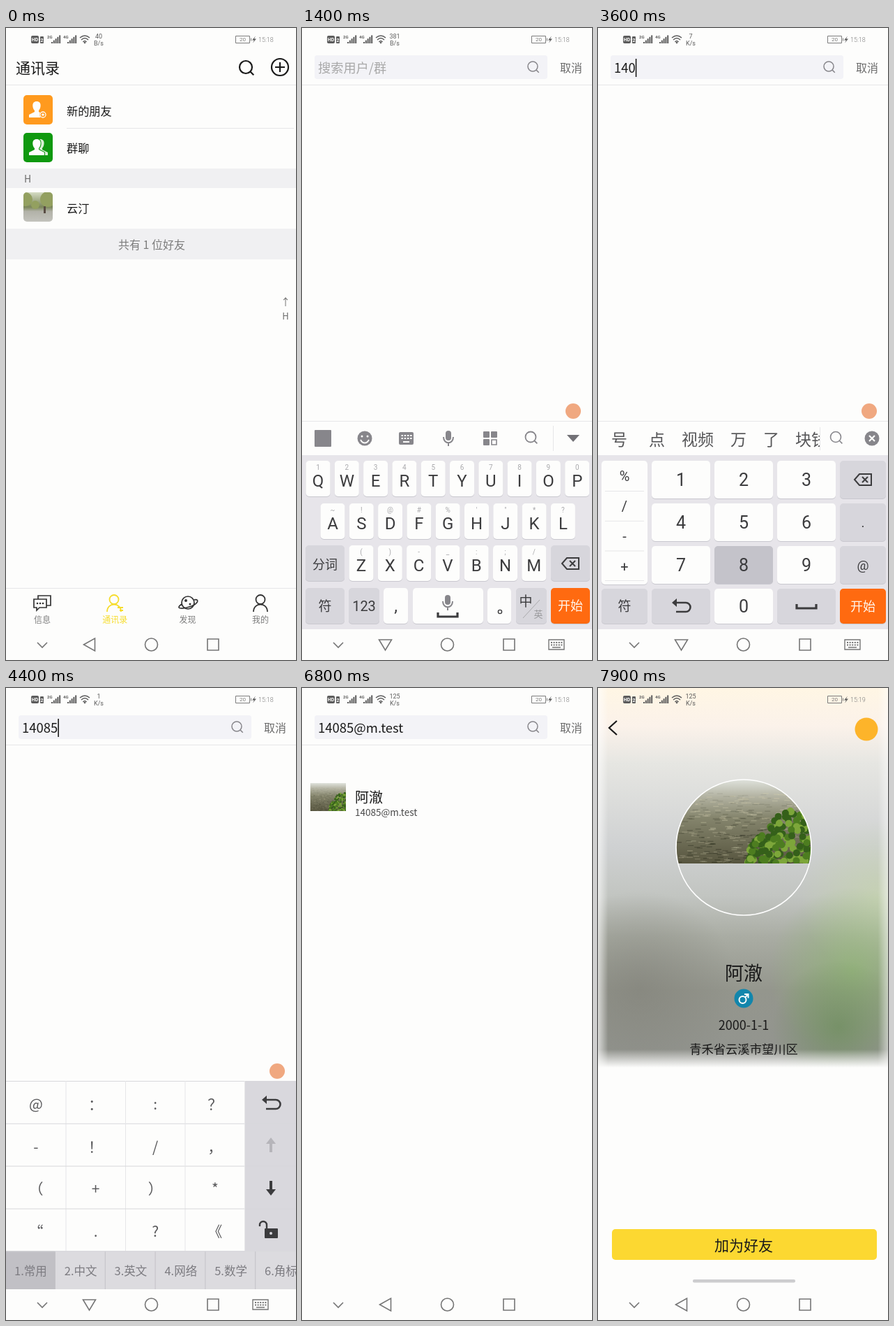
An HTML page with a canvas that plays this animation: 416 px wide and 904 px high, repeating every 8 s.

```html
<!DOCTYPE html>
<html lang="zh-CN">
<head>
<meta charset="utf-8">
<title>联系人搜索</title>
<style>
html, body { margin: 0; width: 100%; height: 100%; overflow: hidden; background: #fdfdfd; }
canvas { display: block; width: 416px; height: 904px; }
</style>
</head>
<body>
<canvas id="stage" width="416" height="904"></canvas>
<script>
const ctx = document.getElementById('stage').getContext('2d');
const LOOP = 8000, W = 416, PAGE_H = 860;
const PAPER = '#fdfdfc', BAND = '#f0f0f2', FIELD = '#f3f3f7', RULE = '#e6e6e8', INK = '#1a1a1a',
      SOFT = '#7c7c7c', KEYBED = '#e7e5ea', DARK_KEY = '#d7d6dc', KEY_INK = '#3c3c3e', TOOL = '#87868b', ORANGE = '#ff6a10';
const CJK = '"Noto Sans CJK SC", "Noto Sans CJK", sans-serif', LATIN = 'Roboto, "Noto Sans CJK SC", "Noto Sans CJK", sans-serif';

const clamp = v => Math.max(0, Math.min(1, v));
const progress = (t, start, length) => clamp((t - start) / length);
const easeOut = u => 1 - (1 - u) ** 4;
const latest = (list, t) => list.filter(e => e[0] <= t).pop();
const noise = n => { const v = Math.sin(n * 12.9898) * 43758.5453; return v - Math.floor(v); };

// Timeline
const SPEED = [[0, '40', 'B/s'], [500, '381', 'B/s'], [2300, '7', 'K/s'], [3700, '1', 'K/s'], [5000, '126', 'B/s'], [5900, '125', 'K/s']];
const TYPED = [[800, ''], [2400, '1'], [3000, '14'], [3300, '140'], [3700, '1408'], [4000, '14085'], [4700, '14085@'], [5100, '14085@m.test']];
const PRESSES = [['123', 1650], ['1', 2350], ['4', 2950], ['0', 3250], ['8', 3650], ['5', 3950], ['符', 4250], ['@', 4600]];
const PANELS = [[0, letterPad], [1750, numberPad], [4400, symbolPad], [4800, numberPad]];
let now = 0;
const pressed = label => PRESSES.some(([l, at]) => l === label && Math.abs(now - at) < 90);

// Drawing helpers: y of text is its visual centre
function text(s, x, y, size, color = INK, align = 'left', font = CJK, weight = 400) {
  ctx.font = `${weight} ${size}px ${font}`;
  ctx.textAlign = align;
  ctx.fillStyle = color;
  ctx.fillText(s, x, y + size * .37);
}
const centre = (s, x, y, size, color, font, weight) => text(s, x, y, size, color, 'center', font, weight);
function rect(x0, y0, x1, y1, fill, r = 0) {
  ctx.beginPath();
  ctx.roundRect(x0, y0, x1 - x0, y1 - y0, r);
  ctx.fillStyle = fill;
  ctx.fill();
}
function disc(x, y, r, fill) {
  ctx.beginPath();
  ctx.arc(x, y, r, 0, 7);
  ctx.fillStyle = fill;
  ctx.fill();
}
function stroke(d, x, y, color, width = 1.6) {
  ctx.save();
  ctx.translate(x, y);
  ctx.strokeStyle = color;
  ctx.lineWidth = width;
  ctx.stroke(new Path2D(d));
  ctx.restore();
}
function shape(d, x, y, fill) {
  ctx.save();
  ctx.translate(x, y);
  ctx.fillStyle = fill;
  ctx.fill(new Path2D(d));
  ctx.restore();
}
const ring = r => `M${r} 0A${r} ${r} 0 1 1 ${-r} 0A${r} ${r} 0 1 1 ${r} 0`;
function clipped(path, draw) {
  ctx.save();
  ctx.beginPath();
  path();
  ctx.clip();
  draw();
  ctx.restore();
}
function gradient(y0, y1, ...stops) {
  const g = ctx.createLinearGradient(0, y0, 0, y1);
  stops.forEach(([at, color]) => g.addColorStop(at, color));
  return g;
}
function glow(x, y, r, rgb, alpha = .8) {
  const g = ctx.createRadialGradient(x, y, 0, x, y, r);
  g.addColorStop(0, `rgba(${rgb},${alpha})`);
  g.addColorStop(1, `rgba(${rgb},0)`);
  ctx.fillStyle = g;
  ctx.fillRect(x - r, y - r, 2 * r, 2 * r);
}
const magnifier = (x, y, r, color, width) =>
  stroke(`${ring(r)}M${r * .7} ${r * .7}L${r * 1.25} ${r * 1.25}`, x, y, color, width);
function ripple(x, y, start) {
  const u = progress(now, start, 300);
  if (u > 0 && u < 1) {
    disc(x, y, 8 + 12 * u, `rgba(140,140,145,${.2 * (1 - u * .6)})`);
    stroke(ring(8 + 12 * u), x, y, 'rgba(140,140,145,.35)', 1);
  }
}

// System bars
function statusBar() {
  const ink = '#5c5c5c', [, amount, unit] = latest(SPEED, now);
  rect(36, 11, 47, 22, ink, 2);
  centre('HD', 41.5, 16.5, 7, PAPER, LATIN, 700);
  rect(49, 12, 54, 22, ink, 1);
  centre('2', 51.5, 17, 7, PAPER, LATIN, 700);
  [['2G', 59], ['4G', 82]].forEach(([label, x]) => {
    text(label, x, 13, 6, ink, 'left', LATIN, 700);
    for (let i = 0; i < 5; i++) rect(x + 6 + i * 2.8, 20 - i * 2.4, x + 8 + i * 2.8, 22, ink);
  });
  stroke('M-7 -4Q0 -10 7 -4M-5 -1Q0 -6 5 -1M-2.5 2Q0 -1 2.5 2', 113, 18, ink, 1.5);
  disc(113, 21, 1.3, ink);
  centre(amount, 133, 12, 9, ink, LATIN);
  centre(unit, 133, 22, 9, ink, LATIN);
  stroke('M0 0H20V10H0ZM22 3V7', 329.5, 11.5, SOFT, 1);
  centre('20', 339.5, 16.5, 8, SOFT, LATIN);
  shape('M2 -5L-3 1H0L-2 5L3 -1H0Z', 356, 16.5, ink);
  text(now < 7800 ? '15:18' : '15:19', 362, 16.5, 9, SOFT, 'left', LATIN, 300);
}
function navBar() {
  const typing = now >= 850 && now < 5900, c = '#757575';
  rect(0, PAGE_H, W, 904, PAPER);
  stroke('M-7 -3L0 4L7 -3', 52, 882, c);
  stroke(typing ? 'M-9 -7H9L0 8Z' : 'M-8 0L8 -9V9Z', 119.5, 882, c);
  stroke(ring(9), 208.5, 882, c);
  stroke('M-8 -8H8V8H-8Z', 297, 882, c);
  if (typing) keyboardIcon(365, 882, c);
}
function keyboardIcon(x, y, c) {
  stroke('M-11 -7H11V7H-11ZM-6 4H6', x, y, c, 1.4);
  for (let i = 0; i < 10; i++) rect(x - 8 + i % 5 * 3.6, y - 4 + (i > 4) * 3.5, x - 6 + i % 5 * 3.6, y - 2 + (i > 4) * 3.5, c);
}

// Contacts
const PERSON = 'M0 -12C8 -12 6 -2 3 1V3L11 7V11H-11V7L-3 3V1C-6 -2 -8 -12 0 -12Z';
const HEAD = 'M0 -11A6.5 6.5 0 1 1 0 2A6.5 6.5 0 1 1 0 -11M-10 13C-10 -1 10 -1 10 13';
function contactsPage() {
  rect(0, 0, W, PAGE_H, PAPER);
  text('通讯录', 14, 57.5, 21);
  magnifier(344, 56, 9, INK, 2.2);
  ripple(345, 57, 80);
  stroke(`${ring(12)}M-7 0H7M0 -7V7`, 393, 56, INK, 2.2);
  rect(0, 81, W, 82, RULE);
  rect(25, 96, 67, 138, '#ff9a1e', 5);
  shape(PERSON, 44, 117, PAPER);
  disc(53, 124, 5, '#ff9a1e');
  stroke(`${ring(4)}M-2 0H2M0 -2V2`, 53, 124, PAPER, 1.3);
  text('新的朋友', 87, 119, 16.2);
  rect(87, 143, 413, 144, RULE);
  rect(25, 150, 67, 192, '#0f990f', 5);
  shape(PERSON, 49, 171, '#d8efd4');
  stroke(PERSON, 44, 171, '#0f990f', 2);
  shape(PERSON, 44, 171, PAPER);
  text('群聊', 87, 172.5, 16.2);
  rect(0, 201, W, 229, BAND);
  text('H', 26, 216, 14, '#6c6c6c');
  clipped(() => ctx.roundRect(25, 235, 42, 42, 5), () => {
    rect(25, 235, 67, 277, gradient(235, 277, [0, '#d5dcc4'], [.5, '#7a8658'], [.65, '#b2b2a8'], [1, '#c3c3bd']));
    [[28, 245, 10], [42, 253, 6], [60, 245, 11]].forEach(([x, y, r]) => disc(x, y, r, '#93a060'));
    rect(54, 255, 57, 265, '#594d44');
  });
  text('云汀', 87, 258, 16.2);
  rect(0, 287, W, 331, BAND);
  centre('共有 1 位好友', 209, 310, 16, SOFT);
  centre('↑', 401, 392, 14, '#6c6c6c');
  centre('H', 401, 412, 13, '#6c6c6c');
  rect(0, 801, W, 802, RULE);
  const yellow = '#f6dc2c', c = '#333333';
  stroke('M-12 -5H6V7H-4L-8 11V7H-12ZM-6 -5V-10H12V4H6', 52, 822, c, 1.7);
  [-7, -3, 1].forEach(dx => disc(52 + dx, 823, 1.3, c));
  stroke(HEAD, 155, 822, yellow, 1.8);
  stroke('M5 7H13M8 11H13', 155, 822, yellow, 1.8);
  stroke(`${ring(9)}M-9 2C-20 10 -6 9 5 5C17 0 15 -6 9 -4`, 261, 822, c, 1.7);
  disc(258, 819, 2, c);
  disc(264, 824, 1.5, c);
  stroke(HEAD, 365, 822, c, 1.8);
  ['信息', '通讯录', '发现', '我的'].forEach((s, i) => centre(s, 52 + i * 104.3, 847, 12, i === 1 ? yellow : SOFT));
}

// Keyboard
function key(x0, y0, x1, y1, label, { dark, size = 24, hint, fill, color = KEY_INK } = {}) {
  rect(x0, y0 + 1, x1, y1 + 1, '#c9c8cf', 5);
  rect(x0, y0, x1, y1, pressed(label) ? '#c4c3ca' : fill || (dark ? DARK_KEY : PAPER), 5);
  const x = (x0 + x1) / 2, y = (y0 + y1) / 2 + (hint ? 2.5 : 0);
  centre(label, x, y, size, color, LATIN);
  if (hint) centre(hint, x, y0 + 9, 10, '#a9a9ac', LATIN);
}
const backspace = (x, y) => stroke('M-12 0L-5 -8H12V8H-5ZM-1 -4L7 4M7 -4L-1 4', x, y, KEY_INK, 2);
const spaceMark = (x, y) => stroke('M-14 -4V2H14V-4', x, y, KEY_INK, 3.2);
const returnMark = (x, y) => {
  stroke('M-8 -5H7A6.5 6.5 0 0 1 7 8H-7', x, y, KEY_INK, 2.6);
  shape('M-13 -5L-6 -11V1Z', x, y, KEY_INK);
};
function mic(x, y, c) {
  rect(x - 4, y - 11, x + 4, y + 3, c, 4);
  stroke('M-7 -2C-7 9 7 9 7 -2M0 6V11', x, y, c, 2);
}
function toolbar() {
  rect(18, 575, 42, 599, TOOL, 1);
  disc(90, 587, 10.5, TOOL);
  disc(86, 584, 1.5, PAPER);
  disc(94, 584, 1.5, PAPER);
  stroke('M-6 2C-3 8 3 8 6 2', 90, 587, PAPER, 1.8);
  rect(139, 578, 160, 596, TOOL, 2);
  for (let i = 0; i < 8; i++) rect(142.5 + i % 4 * 4.2, 582 + (i > 3) * 4, 145 + i % 4 * 4.2, 584 + (i > 3) * 4, PAPER);
  rect(145, 591, 154, 593, PAPER);
  mic(210, 587, TOOL);
  [[260, 577], [271, 577], [260, 588]].forEach(([x, y]) => rect(x, y, x + 9, y + 9, TOOL, 1));
  stroke('M0 0H7V7H0Z', 272, 589, TOOL);
  magnifier(328, 585, 7.5, TOOL, 1.8);
  rect(360, 569, 361, 605, RULE);
  shape('M-9 -5H9L0 5Z', 389, 587, '#727176');
}
function candidates(words) {
  clipped(() => ctx.rect(0, 563, 318, 48), () => words.forEach(([s, x]) => text(s, x, 588, 23, '#555557', 'left', CJK, 200)));
  rect(318, 571, 319, 604, RULE);
  magnifier(341, 585, 7.5, TOOL, 1.6);
  disc(393, 587, 10.5, TOOL);
  stroke('M-4 -4L4 4M4 -4L-4 4', 393, 587, PAPER, 2.2);
}
function bed() {
  rect(0, 562, W, 612, PAPER);
  rect(0, 562, W, 563, RULE);
  rect(0, 611, W, PAGE_H, KEYBED);
}
const startKey = (x, y) => key(x, y, 413, 852, '开始', { fill: ORANGE, color: '#fff6ee', size: 18 });
function letterPad() {
  bed();
  toolbar();
  [['QWERTYUIOP', '1234567890', 23, 619], ['ASDFGHJKL', '~!@#%\'"*?', 44, 680], ['ZXCVBNM', '()-_:;/', 85, 740]].forEach(([row, hints, x, y]) =>
    [...row].forEach((s, i) => key(x - 17.5 + i * 41.3, y, x + 17.5 + i * 41.3, y + 51, s, { hint: hints[i] })));
  key(5, 740, 61, 791, '', { dark: true });
  centre('分词', 33, 767, 18, KEY_INK);
  key(357, 740, 413, 791, '', { dark: true });
  backspace(385, 766);
  key(5, 801, 61, 852, '符', { dark: true, size: 19 });
  key(67, 801, 111, 852, '123', { dark: true, size: 20 });
  key(117, 801, 152, 852, ',');
  key(159, 801, 260, 852, '');
  mic(209, 822, TOOL);
  spaceMark(209, 840);
  key(266, 801, 300, 852, '');
  stroke(ring(2.6), 284, 835, KEY_INK, 1.4);
  key(307, 801, 351, 852, '', { dark: true });
  centre('中', 321, 820, 19, KEY_INK);
  centre('英', 339, 838, 13, '#99999c');
  stroke('M-10 14L14 -12', 327, 830, '#a9a9ac', 1);
  startKey(357, 801);
}
function numberPad() {
  bed();
  if (now >= 2400 && now < 4400) candidates([['号', 19], ['点', 73], ['视频', 120], ['万', 190], ['了', 237], ['块钱', 283]]);
  else if (now >= 4800 && now < 5100) candidates([['m.test', 20], ['k.test', 122], ['d.test', 222]]);
  else toolbar();
  key(5, 619, 71, 796, '');
  ['%', '/', '-', '+'].forEach((s, i) => {
    centre(s, 38, 641 + i * 42.7, 20, KEY_INK, LATIN);
    rect(10, 662 + i * 42.7, 66, 663 + i * 42.7, RULE);
  });
  for (let i = 0; i < 9; i++) {
    const x = 77 + i % 3 * 90, y = 619 + Math.floor(i / 3) * 61;
    key(x, y, x + 84, y + 54, String(i + 1), { size: 25 });
  }
  ['', '.', '@'].forEach((s, i) => key(347, 619 + i * 61, 413, 673 + i * 61, s, { dark: true, size: 19 }));
  backspace(380, 646);
  key(5, 802, 71, 852, '符', { dark: true, size: 19 });
  key(77, 802, 161, 852, '', { dark: true });
  returnMark(119, 827);
  key(167, 802, 251, 852, '0', { size: 25 });
  key(257, 802, 341, 852, '', { dark: true });
  spaceMark(299, 828);
  startKey(347, 802);
}
function symbolPad() {
  rect(0, 562, W, PAGE_H, PAPER);
  rect(342, 562, W, PAGE_H, '#d9d8dd');
  rect(0, 805, W, PAGE_H, '#dcdbdf');
  rect(0, 805, 70, PAGE_H, '#c1c0c5');
  if (pressed('@')) rect(0, 562, 85, 623, '#d9d8dd');
  [...'@：:？-！/，（+）*“.?《'].forEach((s, i) =>
    centre(s, 43 + i % 4 * 85.6, 595 + Math.floor(i / 4) * 60.8, 21, '#59595b', CJK, 200));
  for (let i = 0; i < 5; i++) {
    rect(0, 562 + i * 60.8, W, 563 + i * 60.8, '#d8d8dc');
    if (i < 4) rect(85.5 * (i + 1), 562, 85.5 * (i + 1) + 1, 805, RULE);
    rect(70 + i * 71.8, 806, 71 + i * 71.8, PAGE_H, '#c3c2c7');
  }
  returnMark(380, 594);
  [[654, '#b6b5ba', -1], [715, KEY_INK, 1]].forEach(([y, c, dir]) => {
    stroke(`M0 ${-10 * dir}V${6 * dir}`, 380, y, c, 4);
    shape(`M-7 ${2 * dir}H7L0 ${11 * dir}Z`, 380, y, c);
  });
  rect(371, 773, 390, 787, KEY_INK, 1);
  disc(380, 780, 2, DARK_KEY);
  stroke('M-11 0V-2A5 5 0 0 1 -1 -2V3', 375, 770, KEY_INK, 2.4);
  ['常用', '中文', '英文', '网络', '数学', '角标'].forEach((s, i) => text(`${i + 1}.${s}`, 12 + i * 71.8, 834, 16.5, '#7c7b80', 'left', CJK, 200));
}
function keyboard() {
  const hidden = 1 - easeOut(progress(now, 1050, 250)) + progress(now, 5680, 220) ** 2;
  if (hidden >= 1) return;
  clipped(() => ctx.rect(0, 0, W, PAGE_H), () => {
    ctx.translate(0, hidden * 330);
    disc(389, 548, 11, '#f0a880');
    latest(PANELS, now)[1]();
  });
}

// Search
function landscape(x, y, w, h) {
  clipped(() => ctx.rect(x, y, w, h), () => {
    rect(x, y, x + w, y + h, gradient(y, y + h, [0, '#dfe2dc'], [.2, '#b3b3a2'], [.45, '#85856d'], [1, '#57553f']));
    const u = w / 194;
    for (let i = 0; i < 420; i++) {
      const depth = .15 + .85 * noise(i + .3), px = x + w * noise(i), py = y + h * depth;
      rect(px, py, px + 8 * u, py + 1.3 * u, i % 2 ? `rgba(205,200,170,${.5 - depth * .25})` : `rgba(40,42,28,${depth * .5})`);
    }
    for (let i = 0; i < 160; i++) {
      const fx = noise(i + 500), fy = noise(i + 700);
      const top = .85 - .5 * Math.sin(Math.min(1, fx * 1.3) * 1.57);
      disc(x + w * (.53 + .47 * fx), y + h * (top + (1 - top) * fy), 5 * u, ['#4d7d20', '#7da63a', '#35601a'][i % 3]);
    }
  });
}
function searchPage() {
  rect(0, 0, W, PAGE_H, PAPER);
  rect(18, 39, 352, 73, FIELD, 4);
  const [since, value] = latest(TYPED, now) || [0, ''];
  if (value) text(value, 23, 57, 18.5);
  else text('搜索用户/群', 23, 57, 18.2, '#a8a8a8');
  const lastEdge = Math.floor((now - since) / 500);
  if (since && now < 5700 && lastEdge % 2 === 0) {
    ctx.font = `18.5px ${CJK}`;
    const x = 23 + ctx.measureText(value).width;
    rect(x, 44, x + 1.6, 70, INK);
  }
  magnifier(331, 55, 7, TOOL, 1.5);
  ripple(336, 53, 5450);
  text('取消', 370, 57, 16, '#6c6c6c');
  rect(0, 81, W, 82, RULE);
  if (now >= 5950) {
    if (now >= 6300) {
      ctx.globalAlpha = now < 6400 ? .6 : 1;
      landscape(12, 136, 51, 40);
      ctx.globalAlpha = 1;
    }
    text('阿澈', 76, 157, 20);
    text('14085@m.test', 76, 178, 13.5, '#484848');
  }
  keyboard();
}

// Profile
function backdrop(reveal) {
  const bottom = 8 + 535 * reveal;
  clipped(() => ctx.rect(0, 0, W, bottom), () => {
    ctx.fillStyle = gradient(0, 540, [0, '#fff6e4'], [.1, '#fbf2ea'], [.2, '#e6e6e2'], [.42, '#cfd1d2'], [.55, '#c2c5c1'], [.66, '#a9aca3'], [.8, '#94968d'], [1, '#92948f']);
    ctx.fillRect(0, 0, W, 543);
    glow(400, 300, 110, '198,212,176');
    glow(365, 405, 120, '145,182,118');
    glow(345, 485, 95, '112,142,96');
    glow(60, 430, 140, '128,128,120', .6);
    const side = ctx.createLinearGradient(0, 0, W, 0);
    [[0, .65], [.035, 0], [.965, 0], [1, .5]].forEach(([at, a]) => side.addColorStop(at, `rgba(255,255,255,${a})`));
    ctx.fillStyle = side;
    ctx.fillRect(0, 0, W, 545);
    ctx.fillStyle = gradient(bottom - 26, bottom, [0, 'rgba(253,253,252,0)'], [1, PAPER]);
    ctx.fillRect(0, bottom - 26, W, 27);
    clipped(() => ctx.arc(209, 228, 97, 0, 7), () =>
      clipped(() => ctx.rect(100, 131, 220, 120 * reveal), () => landscape(112, 131, 194, 120)));
    stroke(ring(97), 209, 228, '#ffffff', 1.6);
    ctx.fillStyle = `rgba(255,255,255,${.3 * (1 - reveal)})`;
    ctx.fillRect(0, 82, W, 460);
  });
}
function profilePage() {
  rect(0, 0, W, PAGE_H, PAPER);
  backdrop(progress(now, 6700, 1000));
  stroke('M11 -10L0 0L11 10', 16, 57, INK, 2.2);
  disc(385, 59, 16.5, '#fdb42a');
  centre('阿澈', 209, 408, 27);
  disc(209, 444, 13.5, '#1286ac');
  stroke(`${ring(5)}M4 -4L8 -8M2.5 -8H8V-2.5`, 207.5, 446, PAPER, 2);
  centre('2000-1-1', 209, 482, 18);
  centre('青禾省云溪市望川区', 209, 517, 17.3);
  rect(20, 774, 400, 818, '#fcd831', 5);
  centre('加为好友', 209, 797, 21);
  rect(136, 846, 283, 850.5, '#cdcdcf', 2);
}

// The old page drifts left under a shade while the new one covers it
function push(oldPage, newPage, start) {
  const u = easeOut(progress(now, start, 530));
  if (u < 1) {
    ctx.save();
    ctx.translate(-W * .25 * u, 0);
    oldPage();
    ctx.restore();
    rect(0, 0, W, PAGE_H, `rgba(0,0,0,${.4 * u})`);
  }
  if (u > 0) {
    ctx.save();
    ctx.translate(W * (1 - u), 0);
    newPage();
    ctx.restore();
  }
}
function draw(time) {
  now = time % LOOP;
  ctx.clearRect(0, 0, W, 904);
  if (now < 6000) push(contactsPage, searchPage, 250);
  else push(searchPage, profilePage, 6850);
  navBar();
  statusBar();
}
const begin = performance.now();
(function frame() {
  draw(performance.now() - begin);
  requestAnimationFrame(frame);
})();
</script>
</body>
</html>
```
